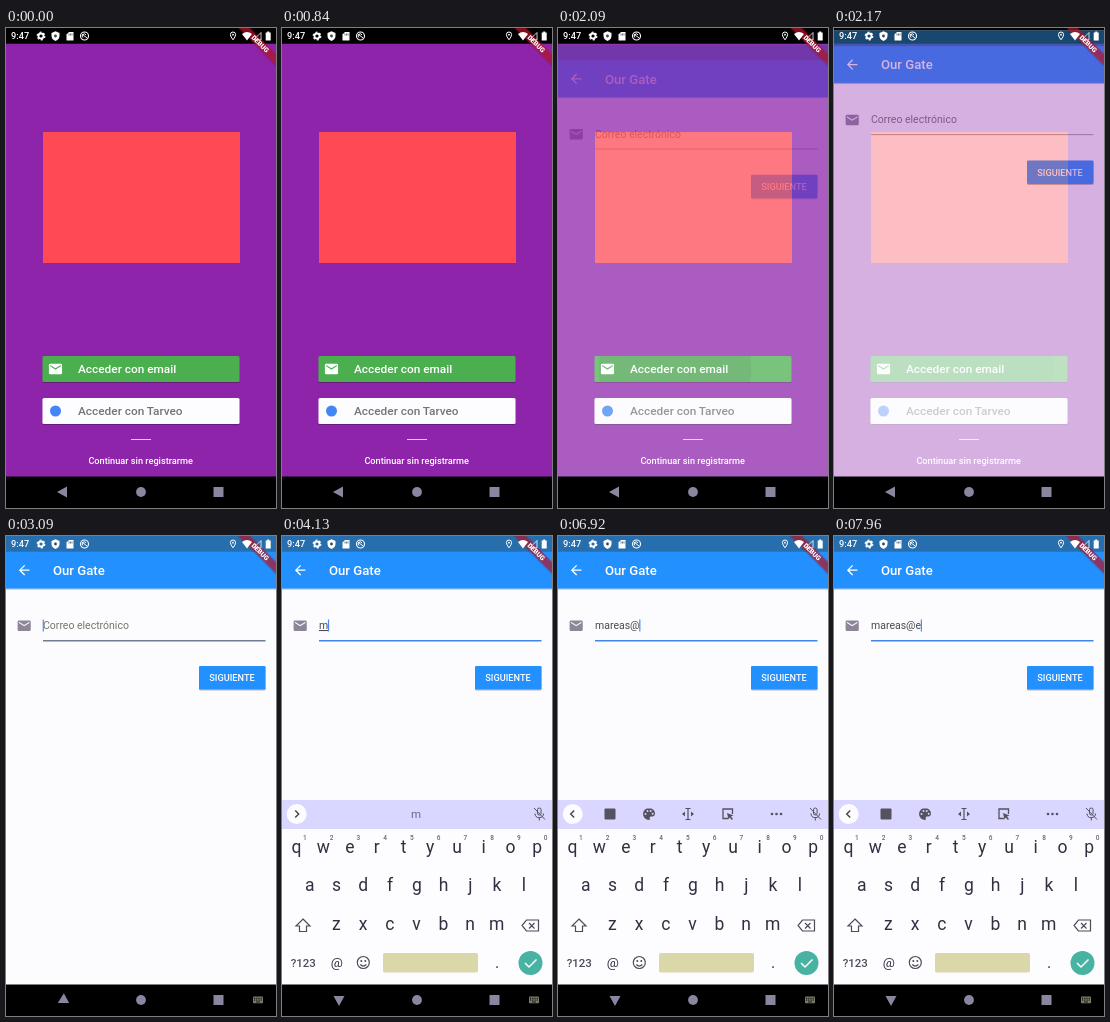
Write an HTML page that moves like this. It is 270 px wide and 480 px high and loops after 8000 ms.

```html
<!DOCTYPE html>
<html lang="es">
<head>
<meta charset="utf-8">
<style>
  html, body { margin: 0; width: 100%; height: 100%; overflow: hidden; background: #000; }
  svg { display: block; width: 100%; height: 100%; font-family: Roboto, sans-serif; }
  .medium { font-weight: 500; }
  .mid { text-anchor: middle; }
  #typed { text-decoration-color: #77747c; text-decoration-thickness: .7px; }
</style>
</head>
<body>
<svg viewBox="0 0 270 480">
  <defs>
    <path id="mail" d="M20 4H4a2 2 0 0 0-2 2v12a2 2 0 0 0 2 2h16a2 2 0 0 0 2-2V6a2 2 0 0 0-2-2zm0 4-8 5-8-5V6l8 5 8-5z"/>
    <path id="back" d="M20 11H7.800l5.600-5.600L12 4l-8 8 8 8 1.400-1.400L7.800 13H20z"/>
    <clipPath id="emailClip"><rect x="36.500" y="328" width="197" height="26" rx="1.500"/></clipPath>
    <filter id="shadow" x="-10%" y="-30%" width="120%" height="180%">
      <feDropShadow dx="0" dy=".8" stdDeviation=".7" flood-opacity=".35"/>
    </filter>
  </defs>

  <g id="welcome">
    <rect width="270" height="449" fill="#8e24aa"/>
    <rect width="270" height="15.700"/>
    <rect x="37" y="104" width="197" height="131" fill="#ff4a55"/>
    <g filter="url(#shadow)">
      <rect x="36.500" y="328" width="197" height="26" rx="1.500" fill="#4caf50"/>
      <rect x="36.500" y="370" width="197" height="26" rx="1.500" fill="#fdfcff"/>
    </g>
    <circle id="ripple" cx="117" cy="341" fill="#246b2d" clip-path="url(#emailClip)"/>
    <use href="#mail" transform="translate(41.600 333.100) scale(.657)" fill="#fff"/>
    <text class="medium" x="72" y="345.300" font-size="11.830" fill="#fff">Acceder con email</text>
    <circle cx="49.500" cy="383" r="5.500" fill="#4285f4"/>
    <text class="medium" x="72" y="387.300" font-size="11.830" fill="#75727a">Acceder con Tarveo</text>
    <path d="M125 411.500h20" stroke="#e6cdf0"/>
    <text class="medium mid" x="134.700" y="436.200" font-size="9.200" fill="#fff">Continuar sin registrarme</text>
  </g>

  <g id="login">
    <rect width="270" height="452" fill="#fcfcff"/>
    <rect y="15" width="270" height="37.500" fill="#2390ff" filter="url(#shadow)"/>
    <rect width="270" height="15.700" fill="#266ead"/>
    <use href="#back" transform="translate(10.300 26.300) scale(.657)" fill="#fff"/>
    <text class="medium" x="47" y="39" font-size="13.140" fill="#fff">Our Gate</text>
    <use href="#mail" transform="translate(10.300 81.800) scale(.657)" fill="#8d8598"/>
    <text id="hint" x="37" y="93" font-size="10.510" fill="#77756a">Correo electrónico</text>
    <text id="typed" x="37" y="93" font-size="10.510" fill="#4a494e"></text>
    <rect id="cursor" y="83.500" width="1.200" height="12" fill="#4a8cf5"/>
    <rect id="line" x="37" width="222.500"/>
    <rect x="193" y="130" width="66.500" height="23.500" rx="1.300" fill="#2390ff" filter="url(#shadow)"/>
    <text class="medium mid" x="226" y="145.300" font-size="9.200" fill="#fff">SIGUIENTE</text>
  </g>

  <g id="banner" transform="translate(270 0) rotate(45)">
    <rect x="-27" y="18.400" width="54" height="7.900" fill="#b0182c" opacity=".72" filter="url(#shadow)"/>
    <text class="mid" y="24.700" font-size="6.700" font-weight="900" fill="#fff">DEBUG</text>
  </g>

  <g id="status" fill="#fff">
    <text class="medium" x="5" y="11.400" font-size="9.200">9:47</text>
    <circle cx="35" cy="8" r="2.500" fill="none" stroke="#fff" stroke-width="1.800"/>
    <circle cx="35" cy="8" r="3.800" fill="none" stroke="#fff" stroke-width="1.200" stroke-dasharray="2 1.980"/>
    <path d="M49.500 3.300l4 1.600v3q0 3.400-4 5-4-1.600-4-5v-3z"/>
    <circle cx="49.500" cy="8" r="1.400" fill="#345"/>
    <path d="M63 4h4.500v8.500h-7V6.500z"/>
    <path d="M63 5.500v2m1.500-2v2m1.500-2v2" stroke="#345" stroke-width=".7"/>
    <circle cx="78.500" cy="8" r="4" fill="none" stroke="#fff" stroke-width="1.100"/>
    <path d="M76 6l5 4M77 9.500a2 2 0 1 1 3-2.500" fill="none" stroke="#fff"/>
    <path d="M227 4a2.600 2.600 0 0 1 2.600 2.600q0 2-2.600 5.200-2.600-3.200-2.600-5.200A2.600 2.600 0 0 1 227 4z" fill="none" stroke="#fff"/>
    <circle cx="227" cy="6.700" r=".9"/>
    <path d="M236 6q5-4 10 0l-5 6.500z"/>
    <path d="M247.500 12l7.500-7.500V12z" fill="none" stroke="#fff" stroke-width=".8"/>
    <path d="M259.700 4.500h1.500v-1h2v1h1.500v8h-5z"/>
  </g>

  <g id="keyboard">
    <rect y="264" width="270" height="190" fill="#fdfcff"/>
    <rect y="264" width="270" height="29" fill="#d9d6ff"/>
    <circle cx="14.700" cy="278" r="10" fill="#fdfdff"/>
    <path id="chevron" fill="none" stroke="#444" stroke-width="1.400"/>
    <text id="suggestion" class="mid" x="134" y="282.200" font-size="11.500" fill="#6c6a80"></text>
    <g id="tools" fill="#55525f">
      <rect x="46.500" y="272.500" width="11" height="11" rx="1"/>
      <path d="M91 272a6 6 0 1 0 0 12q1.500-.3.700-1.800-.4-1.600 1.200-1.700h1.500q2.600-.3 2.600-3-.4-5-6-5.500z"/>
      <g fill="#d9d6ff"><circle cx="87.500" cy="278" r="1"/><circle cx="89.500" cy="275" r="1"/><circle cx="92.700" cy="275" r="1"/><circle cx="94.700" cy="277.700" r="1"/></g>
      <path d="M127.500 272.500h5m-2.500 0v11m-2.500 0h5" fill="none" stroke="#55525f" stroke-width="1.200"/>
      <path d="M127 275.500v5l-3-2.500zm6 0v5l3-2.500z"/>
      <path d="M174.500 278v-5h-9.500v9.500h5" fill="none" stroke="#55525f" stroke-width="1.300"/>
      <path d="M169 277l6.500 2.500-2.500 1 2 2.500-1.200 1-2-2.500-1.300 2z"/>
      <circle cx="214" cy="278" r="1.300"/><circle cx="218.500" cy="278" r="1.300"/><circle cx="223" cy="278" r="1.300"/>
    </g>
    <g fill="none" stroke="#55525f" transform="translate(.5 0)">
      <rect x="255" y="272" width="3.600" height="7" rx="1.800"/>
      <path d="M252.500 277.500q0 4 4.300 4.200 4.200-.2 4.200-4.200M256.800 281.500v3M251.500 272l11 11.500"/>
    </g>
    <g id="keys" class="mid" fill="#303042"></g>
    <g fill="none" stroke="#4c4b58" stroke-width="1.200">
      <path d="M21 383l7 7h-3.500v5.500h-7V390H14z"/>
      <path d="M244.500 384h12v11h-12l-4.500-5.500zM247 387l5.500 5.500m0-5.500l-5.500 5.500"/>
      <circle cx="81.300" cy="426.500" r="6"/>
      <path d="M78.300 428.500q3 3.200 6 0"/>
    </g>
    <circle cx="79.300" cy="425" r="1" fill="#4c4b58"/><circle cx="83.300" cy="425" r="1" fill="#4c4b58"/>
    <rect x="101" y="417" width="95" height="19.500" rx="2" fill="#dad7a8"/>
    <circle cx="248.500" cy="427" r="12" fill="#48b3a3"/>
    <path d="M243 427l4 4 7.500-7.500" fill="none" stroke="#fff" stroke-width="1.500"/>
  </g>

  <rect y="448.500" width="270" height="31.500"/>
  <g fill="#8b86a0">
    <path id="navBack" d="M-6 0L4-5.500V5.500z"/>
    <circle cx="135" cy="464" r="4.900"/>
    <rect x="207.500" y="459" width="10" height="10" rx=".5"/>
    <g id="imeIcon" fill="#7d7b68">
      <rect x="247" y="460.500" width="10" height="6.800" rx=".8"/>
      <path d="M248 462.300h8m-8 1.800h8" stroke="#000" stroke-dasharray="1 .8"/>
      <path d="M250 466h4" stroke="#000" stroke-width=".8"/>
    </g>
  </g>
</svg>
<script>
const $ = id => document.getElementById(id);
const set = (id, attrs) => { for (const k in attrs) $(id).setAttribute(k, attrs[k]); };
const show = (id, on) => set(id, { visibility: on ? "visible" : "hidden" });
const ramp = (t, start, length) => Math.min(1, Math.max(0, (t - start) / length));

const LOOP = 8000, FOCUS = 3040, OPEN = 1920;
const WORD = "mareas@e";
const STROKES = [4040, 4330, 4600, 4840, 5080, 5320, 6700, 7700];

const label = (s, x, y, size, extra = "") =>
  `<text x="${x}" y="${y}" font-size="${size}" ${extra}>${s}</text>`;
const row = (letters, x, y) =>
  [...letters].map((c, i) => label(c, x + i * 26.75, y, 17.5)).join("");

$("keys").innerHTML =
  row("qwertyuiop", 14.5, 317) + row("asdfghjkl", 27.8, 355) + row("zxcvbnm", 54.3, 394) +
  [..."1234567890"].map((c, i) => label(c, 22.8 + i * 26.75, 303.5, 6.5, 'fill="#66647a" class="medium"')).join("") +
  label("?123", 21.3, 430.5, 11.5, 'class="medium" fill="#4c4b58"') + label("@", 54.8, 431, 13.5) + label(".", 215, 432, 16);

function draw(t) {
  // Button ripple
  const grow = t - 1860;
  set("ripple", { r: Math.max(0, grow * 0.33), opacity: 0.35 * (1 - ramp(t, 2000, 200)) });

  // Page fades in while rising
  const page = ramp(t, OPEN, 300);
  set("login", { opacity: page ** 2.4, transform: `translate(0 ${90 * (1 - page) ** 2})` });

  // Text field
  const count = STROKES.filter(s => s <= t).length;
  const text = WORD.slice(0, count);
  const composing = count > 0 && count < 7;
  const focus = ramp(t, FOCUS, 200);
  const since = t - (count ? STROKES[count - 1] : FOCUS);
  $("typed").textContent = text;
  set("typed", { "text-decoration-line": composing ? "underline" : "none" });
  $("typed").style.textDecorationLine = composing ? "underline" : "none";
  show("hint", !count);
  set("cursor", { x: 36.7 + (count ? $("typed").getComputedTextLength() : 0) });
  show("cursor", since >= 0 && since % 1000 < 500);
  const mix = (a, b) => Math.round(a + (b - a) * focus);
  set("line", {
    y: 104, height: t < FOCUS ? 0.7 : 1.5,
    fill: `rgb(${mix(125, 66)},${mix(122, 133)},${mix(115, 235)})`
  });

  // Keyboard
  const rise = ramp(t, 3110, 200);
  set("keyboard", { opacity: rise, transform: `translate(0 ${25 * (1 - rise) ** 2})` });
  show("tools", !composing);
  $("suggestion").textContent = composing ? text : "";
  set("chevron", { d: composing ? "M13.200 274.500l3.500 3.500-3.500 3.500" : "M16.200 274.500l-3.500 3.500 3.500 3.500" });
  show("imeIcon", t >= FOCUS);
  set("navBack", { transform: `translate(57 464) rotate(${-90 * ramp(t, FOCUS, 160)})` });
}

function tick() {
  draw(performance.now() % LOOP);
  requestAnimationFrame(tick);
}
tick();
</script>
</body>
</html>
```
